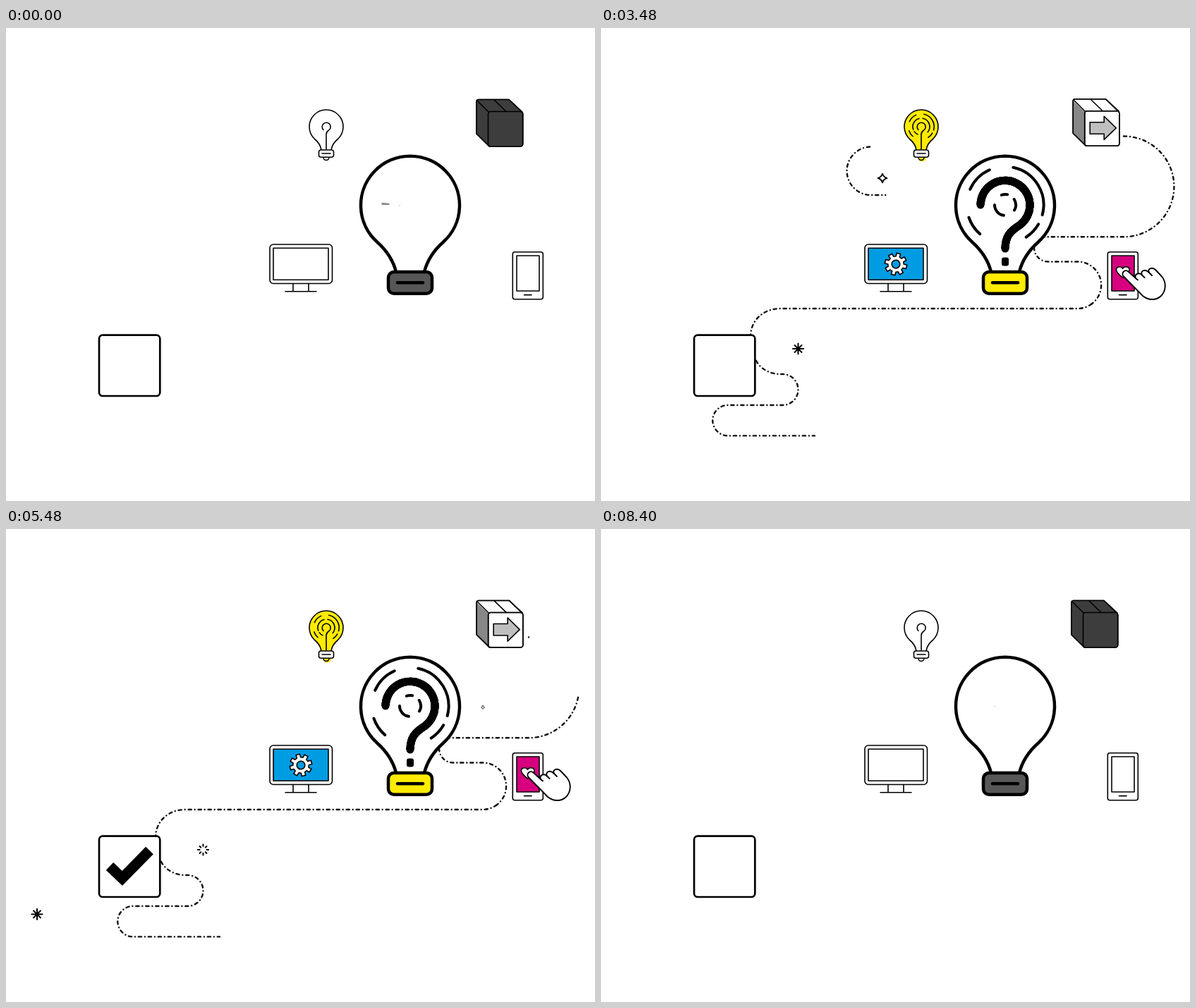
These frames come from a looping animation (835 by 671 pixels, 8.68 s). An HTML page:

```html
<!DOCTYPE html>
<html lang="en">
<head>
<meta charset="utf-8">
<title>From idea to delivery</title>
<style>
html, body { margin: 0; width: 100%; height: 100%; overflow: hidden; background: #fff; }
svg { display: block; width: 835px; height: 671px; }
.line { fill: none; stroke: #000; stroke-linejoin: round; stroke-linecap: round; }
.thin { stroke-width: 1.6; }
.mid { stroke-width: 4; }
.bold { stroke-width: 4.5; }
.paper { fill: #fff; }
.dots { stroke-width: 2.4; stroke: #111; }
</style>
</head>
<body>
<svg viewBox="0 0 835 671">
  <g id="routes" class="line dots">
    <path id="idea" d="M381 168.5A34.3 34.3 0 0 0 381 237H442A22 22 0 0 1 442 281"/>
    <path id="box" d="M741 153.5A71.4 71.4 0 0 1 741 296.3H628"/>
    <path id="tap" d="M614 311C614 322 622 331.5 634 331.5H676A33.2 33.2 0 0 1 695.5 391.5"/>
    <path id="long" d="M695.5 391.5A33.2 33.2 0 0 1 676 398H255C230 398 213 414 212 436"/>
    <path id="foot" d="M220 472C226 484 240 490.5 252 491H257.5A22 22 0 0 1 257.5 535H180A21.7 21.7 0 0 0 180 578.4H303"/>
  </g>

  <g class="line thin">
    <g id="glow" stroke="#f9a11b"></g>
    <path id="smallFill" fill="#ffeb00" stroke="none" d="M447 173C446 167 442 161 437.5 157.5A24 24 0 1 1 470.5 157.5C466 161 462 167 461 173V184A4 4 0 0 1 450 184V173Z"/>
    <path d="M447 173C446 167 442 161 437.5 157.5A24 24 0 1 1 470.5 157.5C466 161 462 167 461 173"/>
    <path d="M450 183.5A4 4 0 0 0 458 183.5"/>
    <g id="smallArcs"></g>
    <path d="M450 144.5A6 6 0 1 1 457 145.5Q454 147.5 454 151V172"/>
    <rect class="paper" x="443.5" y="173" width="21" height="10.2" rx="3"/>
    <path d="M448 178H460"/>
  </g>

  <g class="line thin">
    <rect class="paper" x="374" y="307" width="88.5" height="55.5" rx="5"/>
    <rect id="screen" fill="#009ce3" stroke="none" x="379" y="312.3" width="78" height="45"/>
    <rect x="379" y="312.3" width="78" height="45"/>
    <path d="M407 362.5V373.5M429 362.5V373.5M396 373.7H440"/>
    <g id="gear"><path id="teeth" class="paper"/><circle r="5.8" fill="#009ce3"/></g>
  </g>

  <g class="line bold">
    <path d="M553 346C549 330 540 316 526 303.5A70 70 0 1 1 620 303.5C606 316 597 330 593 346"/>
    <path d="M557 252L559 251" stroke="#ccc" stroke-width="1"/>
    <g id="bigArcs" class="mid"></g>
    <g id="query" stroke-width="11" stroke-linecap="butt"></g>
    <rect id="queryDot" x="568" y="325.5" width="10" height="12" rx="3" fill="#000" stroke="none"/>
    <rect id="base" x="542" y="346" width="62" height="30.7" rx="8"/>
    <path d="M555 361.3H591"/>
  </g>

  <g id="cube" class="line thin">
    <path class="paper" d="M685 168L667 150V104.5Q667 101.5 670 101.5H713L732 119V150Z"/>
    <path id="side" fill="#878787" stroke="none" d="M667 104L683.5 120V167L667 150.5Z"/>
    <rect class="paper" x="683.5" y="118.5" width="49.2" height="49.5" rx="3.5"/>
    <path id="arrow" fill="#bfbfbf" d="M691 134.5H711V126L728 142.7L711 159.2V151H691Z"/>
    <path id="dark" fill="#3d3d3d" stroke="none" d="M686 168L667 150V104.5Q667 101.5 670 101.5H713L732.7 120V165Q732.7 168 729 168Z"/>
    <path d="M685 167.5L667 150V104.5Q667 101.5 670 101.5H713L731.5 119.5M668 103L684.5 119.5M692 102L708.5 118"/>
    <rect x="683.5" y="118.5" width="49.2" height="49.5" rx="3.5"/>
  </g>

  <g class="line thin">
    <g id="pulse" stroke="#f29dc6"></g>
    <rect class="paper" x="718.3" y="317.7" width="43" height="67" rx="3"/>
    <rect id="pink" fill="#d6007f" stroke="none" x="724" y="323" width="32" height="50"/>
    <rect x="724" y="323" width="32" height="50"/>
    <path d="M734.5 378.6H745"/>
    <path id="heart" class="paper" d="M739.5 354C733 349 730.5 346 730.5 343C730.5 338 737.5 337.5 739.5 341.5C741.5 337.5 749 338 749 343C749 347 746 349 739.5 354Z"/>
    <g id="hand" stroke-width="1.9">
      <path class="paper" d="M741 352.5A4.7 4.7 0 0 1 747.5 345.5L758 355C755.5 349 763 346 767 350.5C764 343.5 772 341.5 777 347C774 341 782 338.5 786.5 343.5L795 352.5C802 361 801 373 794 380C787 387 776 386.5 768 380Z"/>
      <path d="M758 355L761 357.5M767 350.5L770.5 354M777 347L781 351"/>
    </g>
  </g>

  <g class="line">
    <rect class="paper" x="132" y="435.7" width="86.3" height="86.3" rx="5" stroke-width="2.7"/>
    <path id="check" d="M147 478.5L164.8 495.5L203.5 456" stroke-width="15" stroke-linecap="butt" stroke-linejoin="miter"/>
  </g>
  <g id="twinkles" class="line"></g>
</svg>
<script>
const LOOP = 8680, STEP = 40, END = 8400;
const $ = id => document.getElementById(id);
const clamp = v => Math.max(0, Math.min(1, v));
const ramp = (t, a, b) => clamp((t - a) / (b - a));
const ease = u => u * u * (3 - 2 * u);
const back = u => 1 + 2.2 * (u - 1) ** 3 + 1.2 * (u - 1) ** 2;
const rad = deg => deg * Math.PI / 180;
const mod = (a, n) => ((a % n) + n) % n;

function add(parent, tag, attrs) {
  const el = document.createElementNS('http://www.w3.org/2000/svg', tag);
  for (const k in attrs) el.setAttribute(k, attrs[k]);
  parent.append(el);
  return el;
}
const polar = (cx, cy, r, deg) =>
  (cx + r * Math.cos(rad(deg))).toFixed(2) + ' ' + (cy + r * Math.sin(rad(deg))).toFixed(2);
const arc = (cx, cy, r, a, b) =>
  `M${polar(cx, cy, r, a)}A${r} ${r} 0 ${b - a > 180 ? 1 : 0} 1 ${polar(cx, cy, r, b)}`;
const show = (el, v) => { el.style.opacity = v; };
const grow = (el, s, x, y) => {
  el.style.display = s > 0.01 ? '' : 'none';
  el.setAttribute('transform', `translate(${x} ${y}) scale(${s}) translate(${-x} ${-y})`);
};
// visible part of a plain stroke, from a to b (0..1)
function trim(el, a, b) {
  const len = el.len || (el.len = el.getTotalLength());
  el.style.display = b - a > 0.001 ? '' : 'none';
  el.setAttribute('stroke-dasharray', `0 ${a * len} ${(b - a) * len} ${len * 2}`);
}
// same for the dash-dot routes
function trimDots(el, a, b) {
  const len = el.len || (el.len = el.getTotalLength());
  const out = [];
  let pos = 0;
  const dash = (s, e) => {
    s = Math.max(s, a * len);
    e = Math.min(e, b * len);
    if (e <= s) return;
    out.push(s - pos, e - s);
    pos = e;
  };
  for (let p = 0; p < len; p += 14) {
    dash(p, p + 4.2);
    dash(p + 9.1, p + 9.15);
  }
  el.style.display = out.length ? '' : 'none';
  el.setAttribute('stroke-dasharray', [0, ...out, len * 2].concat(out.length % 2 ? [] : [0]).slice(1 - 1).join(' ').replace(/^0 /, '0 0 ').replace(/^0 0 /, '0 '.repeat(0)));
}

const ring = [[-156, -114], [-78, 15], [131, 161], [30, 57]];
const bigArcs = [
  ...ring.map(([a, b]) => arc(573, 251, 54.5, a, b)),
  arc(573, 251, 15, -110, -78), arc(573, 251, 15, -32, 30), arc(573, 251, 15, 98, 180)
].map(d => add($('bigArcs'), 'path', { d }));
const smallArcs = [
  ...ring.map(([a, b]) => arc(454, 140, 18.2, a, b)),
  arc(454, 140, 12, -200, -105), arc(454, 140, 12, -80, 40), arc(454, 140, 12, 115, 145)
].map(d => add($('smallArcs'), 'path', { d }));

// layered strokes give the question mark its soft leading edge
const mark = 'M538 251A35 35 0 1 1 594 279.3C580 288 573 296 573 313';
const query = [0, 1, 2, 3].map(() => add($('query'), 'path', { d: mark, opacity: 0.45 }));
const queryEnds = [[538, 251], [573, 313]].map(([cx, cy]) =>
  add($('query'), 'circle', { cx, cy, r: 5.5, fill: '#000', stroke: 'none' }));

let teeth = '';
for (let i = 0; i < 8; i++) {
  [[11.3, -14], [15.8, -10], [15.8, 10], [11.3, 14]].forEach(([r, o]) => {
    teeth += (teeth ? 'L' : 'M') + polar(0, 0, r, i * 45 + o);
  });
}
$('teeth').setAttribute('d', teeth + 'Z');

// rays: angle, inner and outer radius at half life
function makeRays(id, cx, cy, list) {
  const rays = list.map(ray => [add($(id), 'path', {}), ...ray]);
  return age => rays.forEach(([el, deg, a, b]) => {
    const s = 2 * a - b;
    const head = s + (b - s) * ramp(age, 0, 200), tail = s + (b - s) * ramp(age, 200, 600);
    el.style.display = head - tail > 0.2 ? '' : 'none';
    el.setAttribute('d', `M${polar(cx, cy, tail, deg)}L${polar(cx, cy, head, deg)}`);
  });
}
const glow = makeRays('glow', 454, 140,
  [[-90, 45, 53], [-136, 49, 61], [-47, 52, 58], [180, 55, 63], [0, 48, 60], [135, 54, 60]]);
const pulse = makeRays('pulse', 740, 339,
  [[-136, 43, 52], [-90, 39, 42], [-48, 44, 49], [0, 41, 51], [180, 47, 53], [135, 46, 50]]);

// twinkles: kind, x, y, period, offset, life
const star = 'M0 -7Q1.5 -1.5 7 0Q1.5 1.5 0 7Q-1.5 1.5 -7 0Q-1.5 -1.5 0 -7Z';
const twinkles = [
  ['star', 399, 213, 750, 275, 560], ['star', 676, 253, 700, 140, 500],
  ['burst', 44, 546.5, 850, 140, 490], ['burst', 279.5, 455, 850, 800, 490],
  ['gem', 449, 631, 960, 100, 490], ['gem', 600.7, 58.3, 960, 780, 460]
].map(([kind, x, y, period, offset, life]) => {
  const g = add($('twinkles'), 'g', { transform: `translate(${x} ${y})` });
  const d = kind === 'star' ? star : kind === 'gem' ? 'M0 -5.3L5.3 0L0 5.3L-5.3 0Z' : '';
  const el = add(g, 'path', { d, 'stroke-width': kind === 'gem' ? 2.5 : 2 });
  return { kind, el, period, offset, life };
});

function twinkle({ kind, el, period, offset, life }, t) {
  const u = mod(t - offset, period) / life;
  const on = t >= offset && t < END && u < 1;
  el.style.display = on ? '' : 'none';
  if (!on) return;
  if (kind === 'star') {
    el.setAttribute('transform', `scale(${Math.sin(Math.PI * u)})`);
  } else if (kind === 'gem') {
    show(el, ramp(u, 0, 0.45) * (1 - ramp(u, 0.45, 1)));
  } else {
    const inner = ramp(u, 0.65, 1), outer = ramp(u, 0, 0.25);
    let d = '';
    for (let i = 0; i < 8; i++) {
      const r = i % 2 ? 7 : 7.6;
      d += `M${polar(0, 0, r * inner, i * 45)}L${polar(0, 0, r * outer, i * 45)}`;
    }
    el.setAttribute('d', d);
  }
}

const routes = [
  ['box', 300, 860, 5240, 5900], ['tap', 900, 1100, 5950, 6350],
  ['long', 1100, 1640, 6220, 6960], ['foot', 1640, 2200, 6960, 7400]
];
const span = (t, a, b, c, d) => ease(ramp(t, a, b)) * (1 - ease(ramp(t, c, d)));

function draw(t) {
  routes.forEach(([id, a, b, c, d]) => trimDots($(id), ramp(t, c, d), ramp(t, a, b)));
  const age = mod(t - 160, 3040);
  trimDots($('idea'), ramp(age, 1520, 2080), t < 160 ? 0 : ramp(age, 0, 520));

  show($('smallFill'), span(t, 800, 1080, 8000, 8280));
  smallArcs.forEach((el, i) => trim(el, 0, span(t, 1100 + i * 30, 1600 + i * 30, 7700, 8000)));
  glow(t < 5000 ? t - 1000 : 8320 - t);

  show($('screen'), span(t, 800, 1080, 7200, 7480));
  const size = t < 5000 ? back(ramp(t, 1370, 1720)) : 1 - ease(ramp(t, 6900, 7200));
  const g = $('gear');
  g.style.display = t > 1370 && size > 0.01 ? '' : 'none';
  g.setAttribute('transform', `translate(418 335) rotate(${t * 0.03}) scale(${Math.max(size, 0.08)})`);

  bigArcs.forEach((el, i) => trim(el, 0, span(t, 700 + i * 40, 1050 + i * 40, 7700, 8100)));
  const drawn = ramp(t, 1160, 1720), wiped = ramp(t, 7300, 7800);
  query.forEach((el, i) => {
    el.setAttribute('opacity', drawn === 1 ? 1 : 0.45);
    trim(el, wiped, drawn === 1 ? 1 : clamp(drawn + 0.015 - i * 0.014));
  });
  show(queryEnds[0], drawn > 0 && wiped === 0 ? 1 : 0);
  show(queryEnds[1], drawn === 1 && wiped < 1 ? 1 : 0);
  grow($('queryDot'), span(t, 1720, 1880, 7760, 7920), 573, 331.5);
  const mix = span(t, 1800, 2080, 7000, 7300);
  const tone = [[87, 255], [87, 235], [87, 0]].map(([a, b]) => Math.round(a + (b - a) * mix));
  $('base').setAttribute('fill', `rgb(${tone})`);

  const push = span(t, 2640, 2880, 5280, 5520);
  $('cube').setAttribute('transform', `translate(${2.2 * push} ${-0.8 * push})`);
  show($('dark'), 1 - span(t, 500, 1000, 5700, 6100));
  grow($('side'), t > 1360 ? Math.max(0.05, span(t, 1370, 1700, 5520, 5720)) * (t < 5720) : 0, 674, 132);
  grow($('arrow'), span(t, 1640, 1960, 5520, 5720), 709, 143);

  show($('pink'), span(t, 900, 1180, 5800, 6100));
  pulse(t - 1000);
  grow($('heart'), span(t, 2040, 2280, 5800, 6040), 739.5, 346);
  const tapAt = s => Math.sin(Math.PI * ramp(t, s, s + 400));
  const press = 2 * (tapAt(2900) + tapAt(3900));
  const reach = t < 5000 ? (t > 1720 ? back(ramp(t, 1720, 2040)) : 0) : 1 - ease(ramp(t, 6700, 7160));
  grow($('hand'), Math.max(0, reach), 744, 349);
  $('hand').style.translate = `${press}px ${press}px`;

  trim($('check'), ramp(t, 7500, 7800), ease(ramp(t, 4900, 5240)));
  twinkles.forEach(w => twinkle(w, t));
}

// a zero-length lead keeps the dash list in dash, gap order
function dashList(out, len) {
  return out.length ? [0, ...out, len * 2].join(' ') : '';
}
trimDots = function (el, a, b) {
  const len = el.len || (el.len = el.getTotalLength());
  const out = [];
  let pos = 0;
  const dash = (s, e) => {
    s = Math.max(s, a * len);
    e = Math.min(e, b * len);
    if (e <= s) return;
    out.push(s - pos, e - s);
    pos = e;
  };
  for (let p = 0; p < len; p += 14) {
    dash(p, p + 4.2);
    dash(p + 9.1, p + 9.15);
  }
  el.style.display = out.length ? '' : 'none';
  el.setAttribute('stroke-dasharray', dashList(out, len));
};

const start = performance.now();
function frame() {
  const t = (performance.now() - start) % LOOP;
  draw(Math.min(END, Math.floor(t / STEP) * STEP));
  requestAnimationFrame(frame);
}
frame();
</script>
</body>
</html>
```
